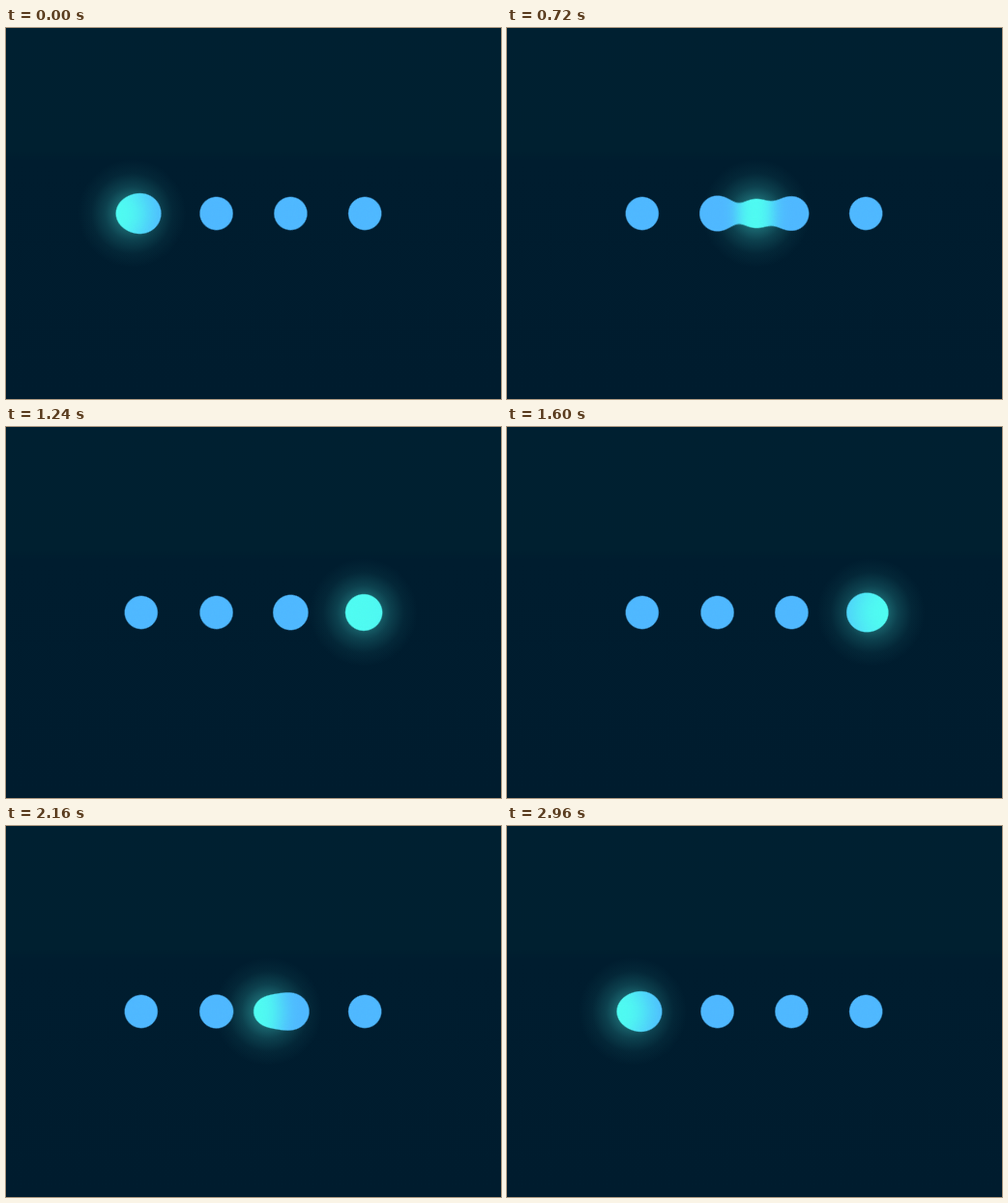
These frames come from a looping animation (512 by 384 pixels, 3 s). An HTML page:

```html
<!DOCTYPE html>
<html lang="en">
<head>
<meta charset="utf-8">
<title>Gooey dots loader</title>
<style>
  html, body { margin: 0; width: 100%; height: 100%; overflow: hidden; }
  body { background: linear-gradient(#002031 0%, #002030 33%, #001d2f 36%, #001c2e 100%); }
  svg { display: block; width: 512px; height: 384px; }
  .dot { fill: #4fb8ff; }
  .mover { fill: #4ffbf1; }
</style>
</head>
<body>
<svg viewBox="0 0 512 384">
  <defs>
    <filter id="goo" filterUnits="userSpaceOnUse" x="0" y="0" width="512" height="384"
            color-interpolation-filters="sRGB">
      <feGaussianBlur stdDeviation="10"/>
      <feColorMatrix values="1 0 0 0 0  0 1 0 0 0  0 0 1 0 0  0 0 0 21 -7.4"/>
    </filter>
    <radialGradient id="halo">
      <stop offset="0" stop-color="#4ffbf1" stop-opacity=".46"/>
      <stop offset=".3" stop-color="#4ffbf1" stop-opacity=".31"/>
      <stop offset=".5" stop-color="#4ffbf1" stop-opacity=".16"/>
      <stop offset=".75" stop-color="#4ffbf1" stop-opacity=".045"/>
      <stop offset="1" stop-color="#4ffbf1" stop-opacity="0"/>
    </radialGradient>
  </defs>
  <circle id="glow" cy="192" r="56" fill="url(#halo)"/>
  <g filter="url(#goo)">
    <circle class="dot" cx="139.8" cy="192" r="17"/>
    <circle class="dot" cx="217.6" cy="192" r="17"/>
    <circle class="dot" cx="294.4" cy="192" r="17"/>
    <circle class="dot" cx="371.2" cy="192" r="17"/>
    <circle class="mover" cy="192" r="15"/>
  </g>
</svg>
<script>
  const LOOP = 3000, STEP = 40, TURN = 1468;
  const dots = [...document.querySelectorAll('.dot')];
  const centers = dots.map(dot => +dot.getAttribute('cx'));
  const mover = document.querySelector('.mover');
  const glow = document.getElementById('glow');
  const bell = (d, width) => Math.exp(-((d / width) ** 2));

  // Swings between the ends; the way back sets off a little faster.
  function moverX(t) {
    const angle = (t - TURN) / LOOP * 2 * Math.PI;
    const lean = angle > 0 && angle < Math.PI ? 5 * Math.sin(2 * angle) : 0;
    return 257 + 127 * Math.cos(angle) - lean;
  }

  function draw(t) {
    const x = moverX(t);
    const gap = Math.min(...centers.map(c => Math.abs(c - x)));
    mover.setAttribute('cx', x);
    mover.setAttribute('r', 15.3 + 3.2 * bell(gap, 10));
    glow.setAttribute('cx', x);

    // Each dot swells in turn, every 500 ms out and back.
    const sweep = Math.min(t, LOOP - t);
    dots.forEach((dot, i) => dot.setAttribute('r', 17 + 3 * bell(sweep - 500 * i, 220)));
  }

  const start = performance.now();
  function tick() {
    const t = (performance.now() - start) % LOOP;
    draw(Math.floor(t / STEP) * STEP);
    requestAnimationFrame(tick);
  }
  tick();
</script>
</body>
</html>
```
